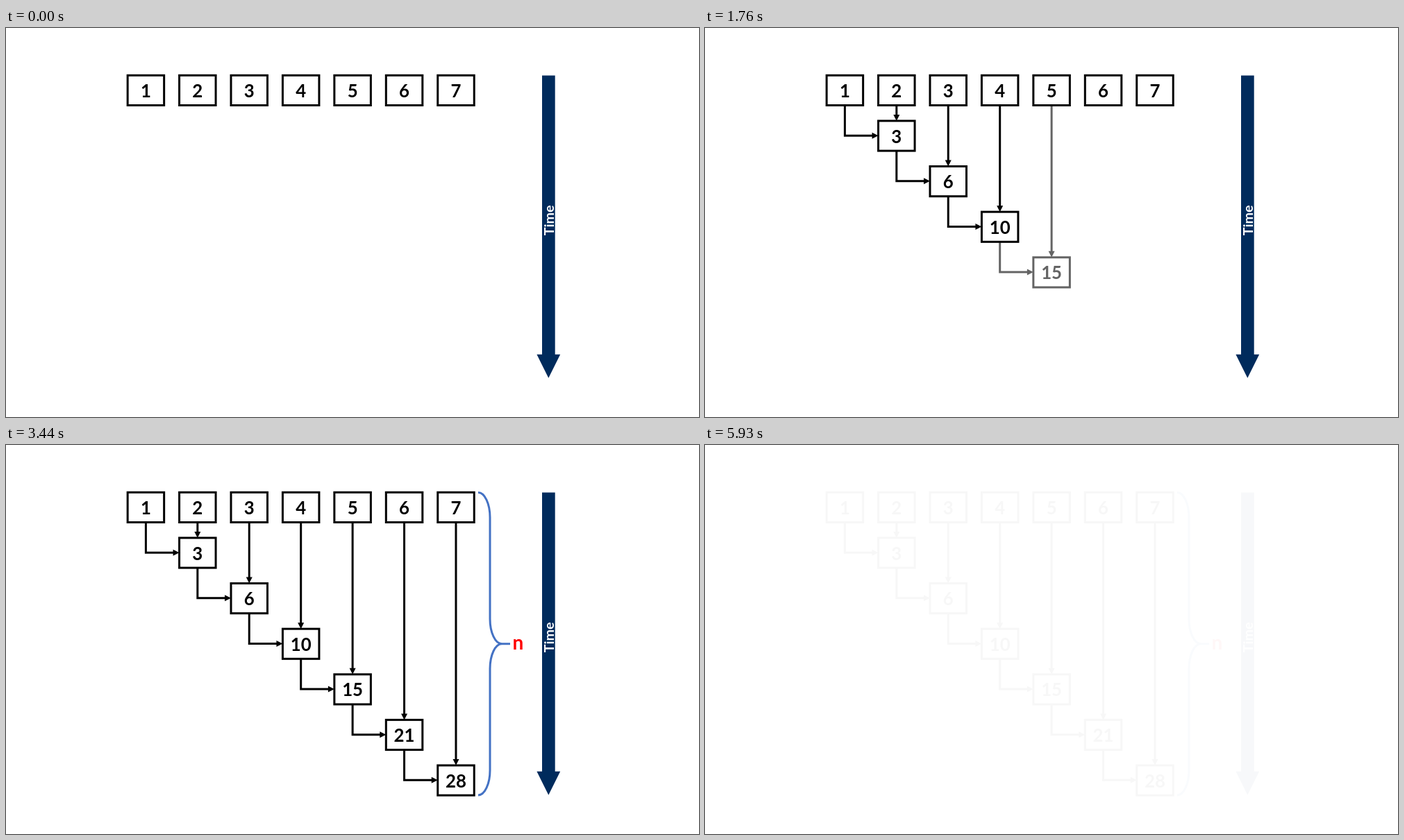
An HTML page with a canvas for the animation above (6010 ms loop, 998 by 561 pixels).

```html
<!DOCTYPE html>
<html lang="en">
<head>
<meta charset="utf-8">
<title>Running sum over time</title>
<style>
  html, body { margin: 0; width: 100%; height: 100%; overflow: hidden; background: #fff; }
  canvas { display: block; width: 998px; height: 561px; }
</style>
</head>
<body>
<canvas id="stage" width="998" height="561"></canvas>
<script>
const ctx = document.getElementById('stage').getContext('2d');
const W = 998, H = 561;
const LOOP = 6010, TICK = 40, FADE = 500, STAGGER = 486.5, FIRST = -4;
const OUT_START = 5490;
const COUNT = 7, BOX_W = 52.5, BOX_H = 43.2, HEAD = 9;
const BLACK = [0, 0, 0], NAVY = [0, 43, 92], BLUE = [68, 114, 196], RED = [255, 0, 0];

const colX = i => 201.4 + 74.43 * i;
const rowY = j => 89.9 + 65.62 * j;
const clamp = v => Math.max(0, Math.min(1, v));
const tint = (rgb, a) => `rgb(${rgb.map(c => Math.round(255 + (c - 255) * a)).join(',')})`;

function setInk(rgb, a) {
  ctx.fillStyle = ctx.strokeStyle = tint(rgb, a);
}

function text(str, x, y, size) {
  ctx.font = `bold ${size}px Lato, Carlito, sans-serif`;
  ctx.textAlign = 'center';
  ctx.textBaseline = 'alphabetic';
  ctx.fillText(str, x, y);
}

function poly(points, closed) {
  ctx.beginPath();
  points.forEach(([x, y]) => ctx.lineTo(x, y));
  if (closed) ctx.fill(); else ctx.stroke();
}

function box(value, col, row) {
  const x = colX(col), y = rowY(row);
  ctx.strokeRect(x - BOX_W / 2, y - BOX_H / 2, BOX_W, BOX_H);
  text(value, x, y + 10, 25.8);
}

function arrowDown(x, y0, y1) {
  poly([[x, y0], [x, y1 - HEAD + 1]]);
  poly([[x, y1], [x - HEAD / 2, y1 - HEAD], [x + HEAD / 2, y1 - HEAD]], true);
}

function elbow(x0, y0, x1, y1) {
  poly([[x0, y0], [x0, y1], [x1 - HEAD + 1, y1]]);
  poly([[x1, y1], [x1 - HEAD, y1 - HEAD / 2], [x1 - HEAD, y1 + HEAD / 2]], true);
}

// Adds input k to the previous sum.
function sumStep(k, a) {
  setInk(BLACK, a);
  const x = colX(k), y = rowY(k);
  arrowDown(x, rowY(0) + BOX_H / 2, y - BOX_H / 2);
  elbow(colX(k - 1), rowY(k - 1) + BOX_H / 2, x - BOX_W / 2, y - 0.3);
  box((k + 1) * (k + 2) / 2, k, k);
}

function brace(a) {
  const left = 680, r = 17, ry = 36, top = 68.5, mid = 286.7, bottom = 505;
  const x = left + r;
  setInk(BLUE, a);
  ctx.beginPath();
  ctx.ellipse(left, top + ry, r, ry, 0, -Math.PI / 2, 0);
  ctx.lineTo(x, mid - ry);
  ctx.ellipse(x + r, mid - ry, r, ry, 0, Math.PI, Math.PI / 2, true);
  ctx.lineTo(726, mid);
  ctx.moveTo(x + r, mid);
  ctx.ellipse(x + r, mid + ry, r, ry, 0, -Math.PI / 2, -Math.PI, true);
  ctx.lineTo(x, bottom - ry);
  ctx.ellipse(left, bottom - ry, r, ry, 0, 0, Math.PI / 2);
  ctx.stroke();
  setInk(RED, a);
  text('n', 737.5, 295, 28);
}

function timeArrow() {
  setInk(NAVY, 1);
  poly([[772, 68.5], [790.7, 68.5], [790.7, 470.7], [798.2, 470.7],
        [781.3, 504.7], [764.4, 470.7], [772, 470.7]], true);
  ctx.save();
  ctx.translate(788.7, 277.3);
  ctx.rotate(-Math.PI / 2);
  ctx.fillStyle = '#fff';
  text('Time', 0, 0, 19.7);
  ctx.restore();
}

function draw(ms) {
  const t = Math.floor(ms / TICK) * TICK;
  const shown = k => t > 0 ? clamp((t - FIRST - STAGGER * k) / FADE) : 0;

  ctx.fillStyle = '#fff';
  ctx.fillRect(0, 0, W, H);
  ctx.lineWidth = 3;
  ctx.lineJoin = 'miter';

  const braceAlpha = shown(COUNT - 1);
  if (braceAlpha > 0) brace(braceAlpha);
  // Newest first, so that a fading line never covers a solid box.
  for (let k = COUNT - 1; k > 0; k--) {
    const a = shown(k - 1);
    if (a > 0) sumStep(k, a);
  }
  setInk(BLACK, 1);
  for (let i = 0; i < COUNT; i++) box(i + 1, i, 0);
  timeArrow();

  if (ms >= OUT_START) {
    const step = Math.min(11, Math.floor((ms - OUT_START) / TICK));
    ctx.fillStyle = `rgba(255,255,255,${clamp(0.065 + step * 0.0823)})`;
    ctx.fillRect(0, 0, W, H);
  }
}

const start = performance.now();
function loop() {
  draw((performance.now() - start) % LOOP);
  requestAnimationFrame(loop);
}
loop();
</script>
</body>
</html>
```
